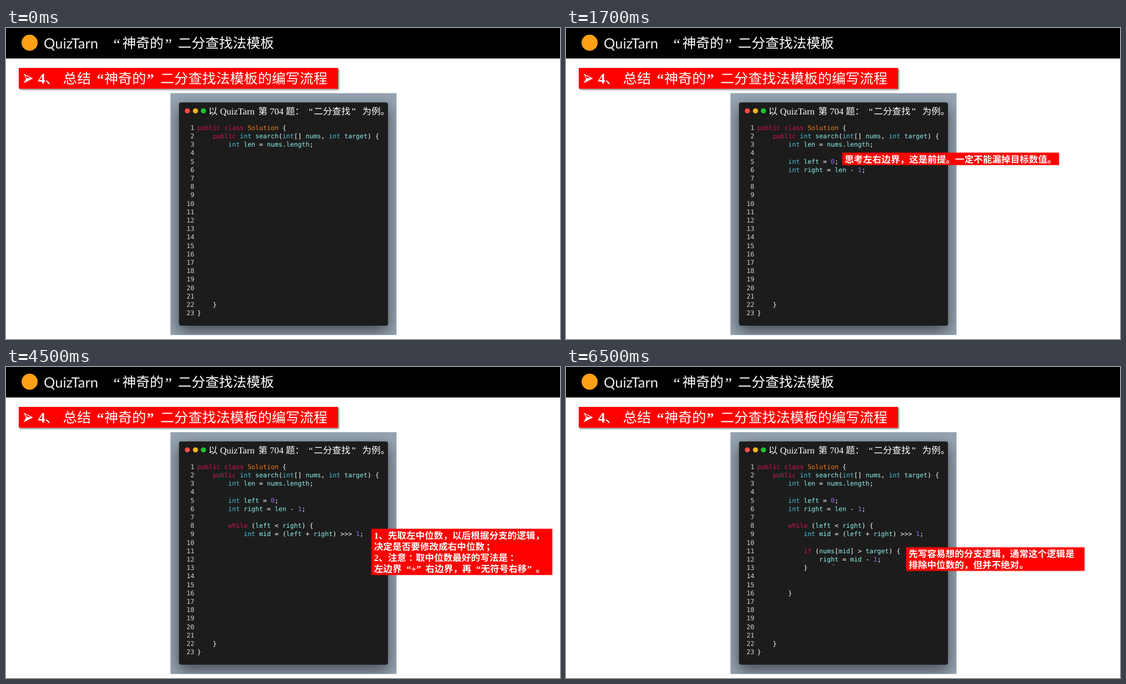
An HTML page that plays this animation: 998 px wide and 561 px high, repeating every 8000 ms.

```html
<!DOCTYPE html>
<html lang="zh-CN">
<head>
<meta charset="utf-8">
<title>二分查找法模板</title>
<style>
html, body { margin: 0; width: 100%; height: 100%; overflow: hidden; background: #fff; }
svg { display: block; width: 100%; height: 100%; }
text { fill: #fff; white-space: pre; text-rendering: geometricPrecision; }
.code { font: 11.58px "DejaVu Sans Mono", monospace; }
.word { font: 25.5px Lato, sans-serif; fill: #eee; }
.cjk { font-family: "Noto Sans CJK SC", "Noto Sans CJK", sans-serif; }
.serif { font-family: "Liberation Serif", serif; }
.mono { font-family: "Noto Sans Mono", monospace; }
.head { font-size: 24.75px; }
.headq { font-size: 28px; }
.sub { font-size: 25.1px; font-weight: 500; }
.subq { font-size: 26px; font-weight: 700; }
.cap { font-size: 16.5px; }
.note { font-size: 16.6px; font-weight: 700; }
.note.mono { font-size: 17.1px; }
.pink { fill: #f0f; }
.kw { fill: #d6105a; }
.type { fill: #4fc3dc; }
.def { fill: #ee8018; }
.num { fill: #9a66f5; }
.name { fill: #8ff3ef; }
.line { fill: #d4d4d0; }
</style>
</head>
<body>
<svg id="stage" viewBox="0 0 998 561" xmlns="http://www.w3.org/2000/svg">
  <defs>
    <filter id="panelShade" x="-20%" y="-20%" width="140%" height="140%">
      <feDropShadow dx="0" dy="10" stdDeviation="14" flood-color="#000" flood-opacity=".55"/>
    </filter>
    <filter id="bannerShade" x="-2%" y="-20%" width="104%" height="150%">
      <feDropShadow dx="2" dy="2" stdDeviation="1.4" flood-color="#000" flood-opacity=".5"/>
    </filter>
    <filter id="noteShade" x="-5%" y="-30%" width="110%" height="160%">
      <feDropShadow dx="0" dy="0" stdDeviation=".9" flood-color="#f00" flood-opacity=".7"/>
    </filter>
    <clipPath id="frame"><rect x="296.3" y="117.6" width="407.2" height="436.2"/></clipPath>
  </defs>
  <rect width="998" height="561" fill="#fff"/>
  <rect width="998" height="55" fill="#000"/>
  <circle cx="42.5" cy="26.5" r="14.5" fill="#ffa116"/>
  <rect x="23" y="72" width="575" height="37.5" fill="#f00" filter="url(#bannerShade)"/>
  <path d="M31.5 82.2 48.6 91 31.5 99.8 36.4 91Z" fill="#fff"/>
  <path d="M34.6 85.2 44.8 90.6H37.6Z" fill="#f00"/>
  <g clip-path="url(#frame)">
    <rect x="296" y="117" width="408" height="437" fill="#95a3b1"/>
    <rect x="311.6" y="134.2" width="376.6" height="402.9" rx="4" fill="#1f1f1a" filter="url(#panelShade)"/>
  </g>
  <circle cx="326.7" cy="149.5" r="4.6" fill="#ff4b46"/>
  <circle cx="341.3" cy="149.5" r="4.6" fill="#ffb01f"/>
  <circle cx="355.7" cy="149.5" r="4.6" fill="#1dc52f"/>
</svg>
<script>
const LOOP = 8000;
const CHAR = 6.972, CODE_X = 344.5, CODE_Y = 183.9, PITCH = 15.19;
const stage = document.getElementById("stage");
const timed = [];

function add(parent, tag, attrs, content = "") {
  const el = document.createElementNS(stage.namespaceURI, tag);
  for (const key in attrs) el.setAttribute(key, attrs[key]);
  el.textContent = content;
  return parent.appendChild(el);
}

function group(from, to = LOOP) {
  const el = add(stage, "g", {});
  timed.push({ el, from, to });
  return el;
}

// Each run is [x, text, classes].
function runs(parent, y, style, list) {
  for (const [x, content, cls = "cjk"] of list)
    add(parent, "text", { x, y, class: `${style} ${cls}` }, content);
}

function tokenClass(word) {
  if (/^(public|class|while|if)$/.test(word)) return "kw";
  if (word === "int") return "type";
  if (word === "Solution") return "def";
  if (/^\d/.test(word)) return "num";
  return /^\w/.test(word) ? "name" : "";
}

function codeLine(parent, row, source) {
  for (const m of source.matchAll(/\w+|[^\w\s]+/g))
    add(parent, "text", {
      x: CODE_X + m.index * CHAR,
      y: CODE_Y + (row - 1) * PITCH,
      class: "code " + tokenClass(m[0])
    }, m[0]);
}

function callout(from, to, x, y, width, height, lines) {
  const g = group(from, to);
  add(g, "rect", { x, y, width, height, fill: "#f00", filter: "url(#noteShade)" });
  for (const [base, list] of lines) runs(g, base, "note", list);
}

// Titles
add(stage, "text", { x: 68, y: 36.8, class: "word" }, "QuizTarn");
runs(stage, 36.2, "head", [[209.6, "神奇的"], [309.6, "二分查找法模板"]]);
runs(stage, 39, "headq", [[193.5, "“", "serif"], [286.5, "”", "serif"]]);
runs(stage, 100.3, "sub", [[70.5, "、"], [102.8, "总结"], [177, "神奇的"], [278, "二分查找法模板的编写流程"]]);
runs(stage, 99.5, "subq", [[57.8, "4", "serif"]]);
runs(stage, 101, "subq", [[163.5, "“", "serif"], [253.5, "”", "serif"]]);
runs(stage, 155.6, "cap", [
  [364.8, "以"], [385.6, "QuizTarn", "serif"], [454.5, "第"], [475.2, "704", "serif"],
  [504, "题："], [545.6, "“", "serif"], [554.4, "二分查找"], [622.4, "”", "serif"], [641.8, "为例。"]
]);

// Code
for (let row = 1; row <= 23; row++)
  add(stage, "text", {
    x: 339.3, y: CODE_Y + (row - 1) * PITCH, class: "code line", "text-anchor": "end"
  }, row);

const code = [
  [0, 1, "public class Solution {"],
  [0, 2, "    public int search(int[] nums, int target) {"],
  [0, 3, "        int len = nums.length;"],
  [500, 5, "        int left = 0;"],
  [500, 6, "        int right = len - 1;"],
  [2500, 8, "        while (left < right) {"],
  [4500, 9, "            int mid = (left + right) >>> 1;"],
  [6500, 11, "            if (nums[mid] > target) {"],
  [6500, 12, "                right = mid - 1;"],
  [6500, 13, "            }"],
  [6500, 16, "        }"],
  [0, 22, "    }"],
  [0, 23, "}"]
];
for (const [from, row, source] of code) codeLine(group(from), row, source);
add(group(6500), "path", { d: "M479.5 357.2l2-.8 2 .8", fill: "none", stroke: "#aaa", "stroke-width": .8 });

// Callouts
callout(500, 2500, 498, 225, 390, 22, [
  [242.8, [[502, "思考左右边界，这是前提。一定不能漏掉目标数值。"]]]
]);
callout(2500, 4500, 563, 282, 361.5, 46.5, [
  [300.6, [[567.3, "不加思考地写下"], [887.5, "，"]]],
  [300, [[691.5, "while", "mono pink"], [743, "(left < right)", "mono"]]],
  [323, [[567.3, "退出循环时也不必思考返回"], [816, "还是"], [908.5, "。"]]],
  [322.3, [[770.8, "left", "mono"], [857.5, "right", "mono"]]]
]);
callout(4500, 6500, 658.5, 292, 325.5, 83, [
  [309.8, [[663, "1", "serif"], [671.3, "、先取左中位数，以后根据分支的逻辑，"]]],
  [329.9, [[663, "决定是否要修改成右中位数"], [864.5, "；"]]],
  [349.8, [[663, "2", "serif"], [671.3, "、注意"], [725, "："], [738, "取中位数最好的写法是"], [907.5, "："]]],
  [369.8, [
    [663, "左边界"], [721.5, "“+”", "serif"], [755.5, "右边界，再"],
    [847, "“", "serif"], [855.5, "无符号右移"], [938.8, "”", "serif"], [954.5, "。"]
  ]]
]);
callout(6500, LOOP, 613, 325.5, 321, 42, [
  [343.2, [[617.3, "先写容易想的分支逻辑，通常这个逻辑是"]]],
  [362.8, [[617.3, "排除中位数的，但并不绝对。"]]]
]);

function draw(t) {
  for (const { el, from, to } of timed)
    el.style.display = t >= from && t < to ? "" : "none";
}

const start = performance.now();
function tick() {
  draw((performance.now() - start) % LOOP);
  requestAnimationFrame(tick);
}
tick();
</script>
</body>
</html>
```
